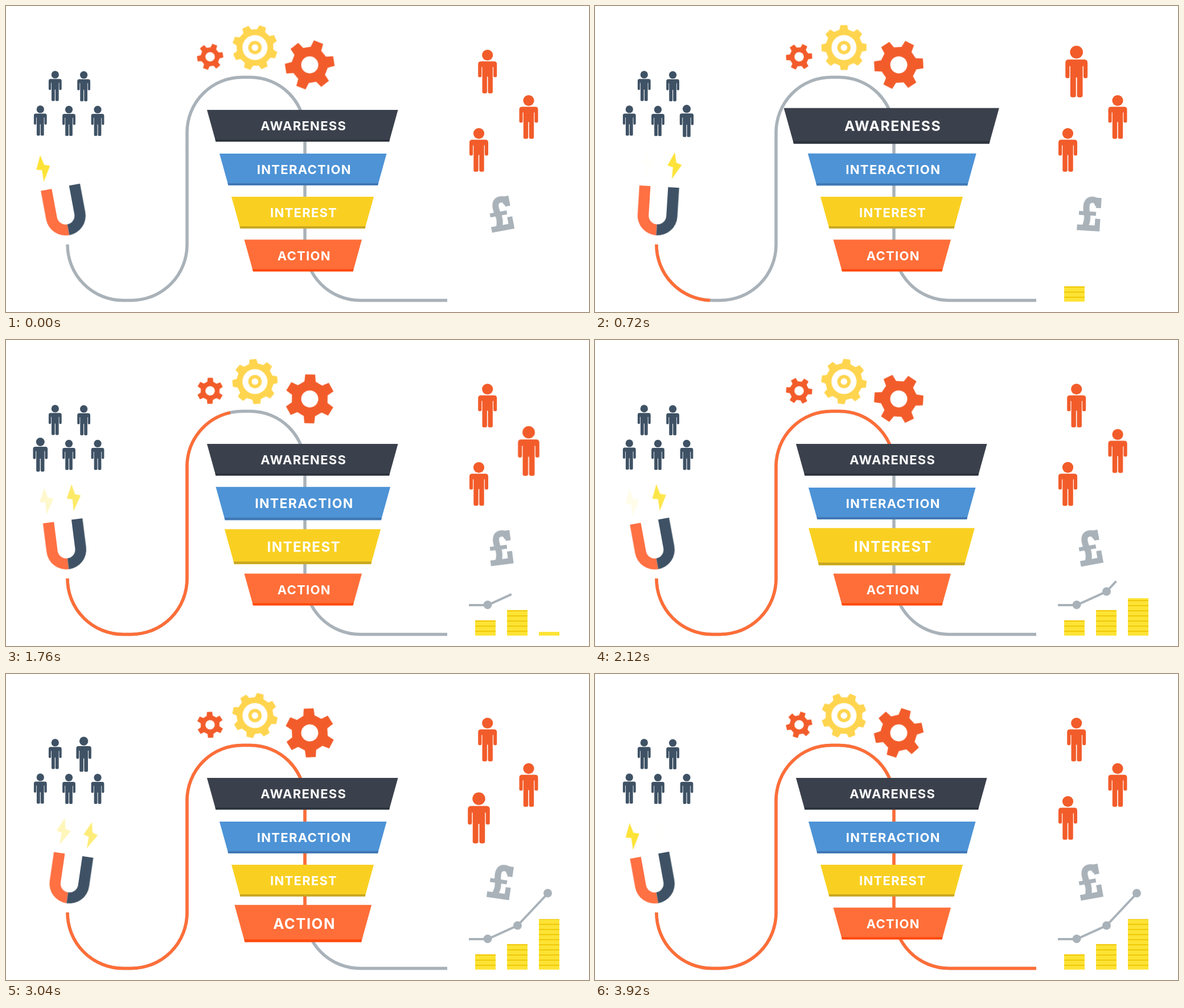
Animation of 1024x539 px, one loop 3960 ms. Source, as an HTML page:

```html
<!DOCTYPE html>
<html lang="en">
<head>
<meta charset="utf-8">
<title>Marketing funnel</title>
<style>
  html, body { margin: 0; width: 100%; height: 100%; overflow: hidden; background: #fff; }
  svg { display: block; width: 100%; height: 100%; }
  text { font: 700 22px Inter, "Open Sans", sans-serif; letter-spacing: 1.3px; fill: #fff; text-anchor: middle; }
  .line { fill: none; stroke: #a9b2b9; stroke-width: 5.5; }
  .hot { stroke: #ff6e38; }
  .grey { fill: #a9b2b9; }
  .spin { animation: spin 3960ms linear infinite; }
  .back { animation-direction: reverse; }
  .sway { animation: sway 990ms cubic-bezier(.364, 0, .636, 1) -1920ms infinite alternate; }
  .bolt { fill: #fde335; animation: flash 660ms cubic-bezier(.364, 0, .636, 1) infinite alternate; }
  .late { animation-direction: alternate-reverse; }
  @keyframes spin { to { transform: rotate(360deg); } }
  @keyframes sway { from { transform: rotate(-10.7deg); } to { transform: rotate(8.3deg); } }
  @keyframes flash { from { opacity: 1; } to { opacity: 0; } }
</style>
</head>
<body>
<svg viewBox="0 0 1024 539" preserveAspectRatio="none">
  <defs>
    <path id="route" d="M108 420A98 98 0 0 0 206 518.5H220A98 98 0 0 0 318 420V222A97 97 0 0 1 415 125.5H429A96 96 0 0 1 525 222V421A97 97 0 0 0 622 518.5H775"/>
    <path id="bolt" d="M84 256L72.5 280L82.3 282.6L81.5 303.5L97.5 277.5L87.7 274Z"/>
    <g id="person">
      <circle cy="-29" r="9.6"/>
      <path d="M-11.5 -18H11.5Q16.5 -18 16.5 -13V7.5Q16.5 10 13.4 10T10.4 7.5V-8H9.2V36Q9.2 38.5 5 38.5T.8 36V9H-.8V36Q-.8 38.5 -5 38.5T-9.2 36V-8H-10.4V7.5Q-10.4 10 -13.4 10T-16.5 7.5V-13Q-16.5 -18 -11.5 -18Z"/>
    </g>
    <pattern id="coins" patternUnits="userSpaceOnUse" x="0" y="494" width="40" height="9">
      <rect width="40" height="9" fill="#fde335"/>
      <rect width="40" height="2" fill="#f0c808"/>
    </pattern>
  </defs>

  <use href="#route" class="line"/>
  <use href="#route" class="line hot" id="flow"/>

  <g id="gears"></g>
  <g id="people"></g>
  <g id="funnel"></g>

  <g transform="translate(108.5 389)">
    <g class="sway">
      <g transform="translate(-108.5 -389)">
        <path fill="#ff7043" d="M73.5 318H93V369A15.5 15.5 0 0 0 108.5 384.5V404A35 35 0 0 1 73.5 369Z"/>
        <path fill="#3f5265" d="M143.5 318H124V369A15.5 15.5 0 0 1 108.5 384.5V404A35 35 0 0 0 143.5 369Z"/>
        <use href="#bolt" class="bolt"/>
        <use href="#bolt" class="bolt late" x="48"/>
      </g>
    </g>
  </g>

  <g transform="translate(869 366)">
    <g class="sway">
      <g transform="translate(-869 -366)" class="grey">
        <path fill="none" stroke="#a9b2b9" stroke-width="11" d="M862 389Q867 377 864 366Q858 341 873 341Q881 341 883 351"/>
        <path d="M879 337H888V355H879ZM850 362H880V369H850ZM848 386H879V374H888V396H848Z"/>
      </g>
    </g>
  </g>

  <g fill="url(#coins)">
    <rect class="stack" x="824" width="36"/>
    <rect class="stack" x="880" width="36"/>
    <rect class="stack" x="936" width="36"/>
  </g>
  <path id="graph" class="line" style="stroke-width:4" d="M813 467H846L898.5 443L952 386"/>
  <g class="grey">
    <circle class="dot" cx="846" cy="466.5"/>
    <circle class="dot" cx="898.5" cy="443"/>
    <circle class="dot" cx="951.5" cy="386"/>
  </g>
</svg>

<script>
const LOOP = 3960;
const $ = id => document.getElementById(id);
const all = cls => [...document.getElementsByClassName(cls)];
const clamp = v => Math.min(1, Math.max(0, v));
const smooth = v => { v = clamp(v); return v * v * (3 - 2 * v); };
const ramp = (t, a, b) => smooth((t - a) / (b - a));
const pulse = (t, peak, half) => smooth(1 - Math.abs(t - peak) / half);

// Toothed outline plus concentric circles cut by the even-odd rule
function gear(x, y, n, phase, outer, root, holes, colour, cls) {
  const step = 2 * Math.PI / n, pts = [];
  for (let i = 0; i < n; i++) {
    for (const [f, r] of [[-.3, root], [-.19, outer], [.19, outer], [.3, root]]) {
      const a = (i + f) * step - Math.PI / 2 + phase * Math.PI / 180;
      pts.push((r * Math.cos(a)).toFixed(2) + " " + (r * Math.sin(a)).toFixed(2));
    }
  }
  const rings = holes.map(r => `M${-r} 0A${r} ${r} 0 1 0 ${r} 0A${r} ${r} 0 1 0 ${-r} 0Z`).join("");
  return `<g transform="translate(${x} ${y})"><path class="${cls}" fill="${colour}" fill-rule="evenodd" d="M${pts.join("L")}Z${rings}"/></g>`;
}
$("gears").innerHTML =
  gear(358.5, 89.5, 6, 21, 23.3, 16.8, [8.3], "#f25c2a", "spin") +
  gear(437.3, 73.2, 8, 20, 40, 32.5, [22, 11.8, 5.8], "#ffd54f", "spin back") +
  gear(533.5, 103.7, 6, 21, 43.8, 32, [15], "#f25c2a", "spin");

// x, y, size, peak time, half length, growth
const NAVY = [
  [161, 202.5, .69, 500, 400, .16], [110.5, 202.5, .69, 1090, 400, .15], [60.3, 202, .69, 1660, 400, .15],
  [86.3, 141, .69, 2480, 400, .16], [136.6, 141.5, .69, 3040, 400, .16]
];
const RED = [
  [845.7, 115.5, 1, 860, 700, .2], [918, 195.5, 1, 1500, 700, .2], [830.5, 253.5, 1, 2840, 800, .2]
];
const folk = [...NAVY, ...RED];
$("people").innerHTML = folk.map((p, i) =>
  `<use href="#person" fill="${i < NAVY.length ? "#3f5265" : "#f25c2a"}"/>`).join("");

// label, top, left, right, fill, edge, peak time, half length
const bands = [
  ["AWARENESS", 183, 353, 688.5, "#3b414c", "#2f353f", 840, 380],
  ["INTERACTION", 260, 375, 668.5, "#4d93d6", "#4078b4", 1310, 680],
  ["INTEREST", 336, 396, 646, "#f9d022", "#c9a822", 2100, 760],
  ["ACTION", 411.5, 418.5, 625, "#ff6e38", "#ff4a0d", 3080, 780]
];
$("funnel").innerHTML = bands.map(([label, top, left, right, fill, edge]) => {
  const w = (right - left) / 2;
  return `<g><path fill="${fill}" d="M${-w} -28H${w}L${w - 15.5} 28H${15.5 - w}Z"/>
    <path fill="${edge}" d="M${14.4 - w} 24H${w - 14.4}L${w - 15.5} 28H${15.5 - w}Z"/>
    <text x="2" y="8">${label}</text></g>`;
}).join("");

const people = [...$("people").children], blocks = [...$("funnel").children];
const stacks = all("stack"), dots = all("dot");
const growth = [[27, 320, 680], [45, 860, 1360], [89, 1640, 2360]];
const reach = [33, 90.7, 168];
const trail = [[840, 0], [1120, 24], [1760, 79], [2520, 156], [2640, 170]];
const total = $("route").getTotalLength();

function along(points, t) {
  let v = points[0][1];
  for (let i = 1; i < points.length; i++) {
    const [a, from] = points[i - 1], [b, to] = points[i];
    v += (to - from) * clamp((t - a) / (b - a));
  }
  return v;
}
function reveal(el, len) {
  el.style.visibility = len > 0 ? "visible" : "hidden";
  el.setAttribute("stroke-dasharray", len.toFixed(2) + " 3000");
}
function place(el, x, y, s) {
  el.setAttribute("transform", `translate(${x} ${y}) scale(${s.toFixed(4)})`);
}

function draw(t) {
  reveal($("flow"), 1035 * ramp(t, 0, 3000) + (total - 1035) * ramp(t, 3080, 3880));

  folk.forEach(([x, y, size, peak, half, grow], i) =>
    place(people[i], x, y, size * (1 + grow * pulse(t, peak, half))));

  bands.forEach(([, top, left, right, , , peak, half], i) =>
    place(blocks[i], (left + right) / 2, top + 28, 1 + .167 * pulse(t, peak, half)));

  growth.forEach(([h, from, to], i) => {
    const now = h * ramp(t, from, to);
    stacks[i].setAttribute("y", 520.7 - now);
    stacks[i].setAttribute("height", now);
  });

  const len = along(trail, t);
  reveal($("graph"), len);
  dots.forEach((dot, i) => dot.setAttribute("r", 7.5 * clamp((len - reach[i] + 2) / 10 + (t > 2760 ? 1 : 0))));
}

let start;
function tick(now) {
  start ??= now;
  draw((now - start) % LOOP);
  requestAnimationFrame(tick);
}
draw(0);
requestAnimationFrame(tick);
</script>
</body>
</html>
```
